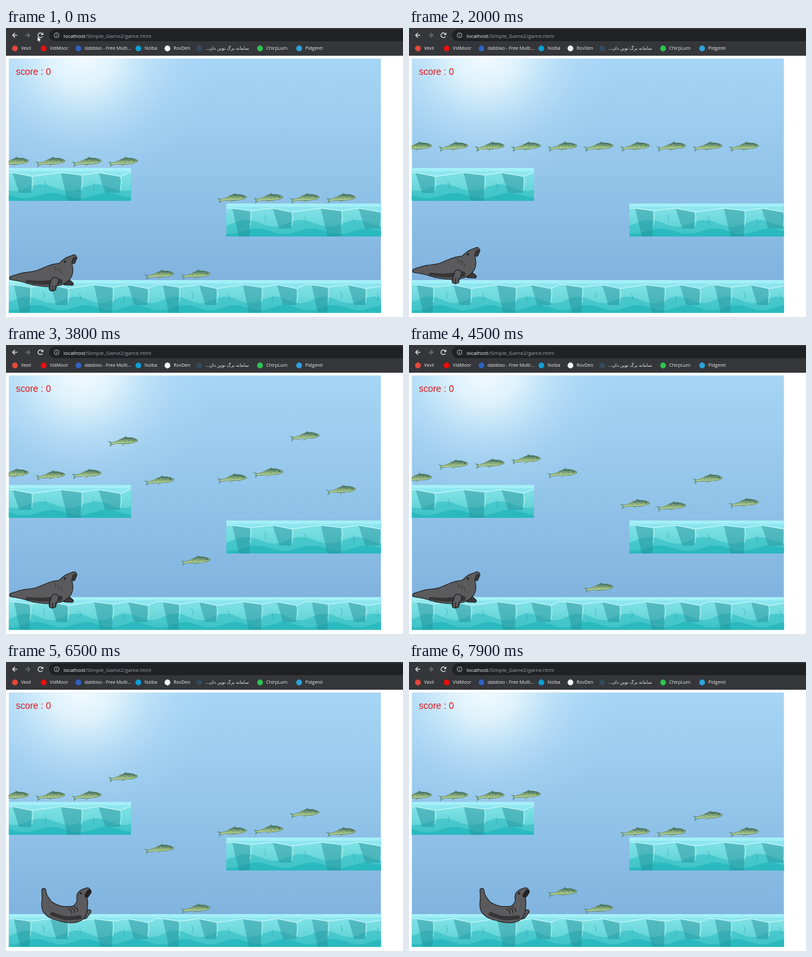
Write an HTML page with a canvas that moves like this. It is 600 by 438 pixels and loops after 8000 ms.

```html
<!DOCTYPE html>
<html lang="en">
<head>
<meta charset="utf-8">
<title>Simple game</title>
<style>
html, body { margin: 0; width: 100%; height: 100%; overflow: hidden; background: #fff; }
#stage { position: absolute; left: 0; top: 0; width: 600px; height: 438px; overflow: hidden; }
canvas { position: absolute; left: 0; top: 0; }
span { position: absolute; white-space: pre; }
.url { left: 87px; top: 5.5px; font: 7.85px/12px "Open Sans", sans-serif; color: #9aa0a6; }
.url b { font-weight: 400; color: #f1f3f4; }
.mark { top: 25px; font: 7px/12px "Open Sans", "DejaVu Sans", sans-serif; color: #e8eaed; }
.score { left: 15px; top: 58.6px; font: 13.8px/16px "Liberation Sans", Arial, sans-serif; color: #e0161f; }
</style>
</head>
<body>
<div id="stage">
  <canvas id="view" width="600" height="438"></canvas>
  <span class="url"><b>localhost</b>/Simple_Game2/game.html</span>
  <span class="score">score : 0</span>
</div>
<script>
const LOOP = 8000, STEP = 100, START = 0.706, G = 160, TOP = 46;
const LEFT = 203, RIGHT = 258, GROUND = 374;
const INK = '#18181a', HIDE = '#5b5b5d', DARK = '#3a3a3c', PALE = '#e8eaed', GREY = '#9aa0a6';
const ctx = document.getElementById('view').getContext('2d');

const bookmarks = [
  [13.5, '#e5483b', 'Vexil'], [57, '#f00c0c', 'VidMoor'], [109.5, '#2f62c4', 'dabbixo - Free Multi...'],
  [200, '#0c9fd6', 'Nolba'], [244, '#f3f4f5', 'RovDen'], [292, '#34495e', 'سامانه برگ نوین دان...'],
  [384, '#2fc351', 'ChirpLum'], [443, '#2ba3dd', 'Pidgerel']
];

// resting height and bounciness of each fish, left to right
const school = [
  [LEFT, .554], [LEFT, .618], [LEFT, .624], [LEFT, .754], [GROUND, .75],
  [GROUND, .4], [RIGHT, .596], [RIGHT, .619], [RIGHT, .763], [RIGHT, .55]
];

// spines: x, y, radius
const FISH = [[6, 3, 1], [14, 1.5, 1.8], [25, -1, 4], [36, -1.5, 3.8], [44, -1.5, 1]];
const RESTING = [[8, 379, 2], [24, 378, 6], [48, 379, 11], [72, 375, 16], [86, 370, 14], [93, 355, 6.5], [103, 348, 3.8]];
const CURLED = [[57, 346, 2.5], [59, 357, 4], [66, 374, 10], [86, 382, 11], [107, 381, 12], [115, 366, 8], [115, 354, 7], [123, 347, 4.5]];

function poly(c, pts, fill) {
  c.beginPath();
  pts.forEach(p => c.lineTo(...p));
  c.fillStyle = fill;
  c.fill();
}

function line(c, pts, color, width = 1) {
  c.beginPath();
  pts.forEach(p => c.lineTo(...p));
  c.strokeStyle = color;
  c.lineWidth = width;
  c.stroke();
}

function disc(c, x, y, r, fill) {
  c.beginPath();
  c.arc(x, y, r, 0, 7);
  c.fillStyle = fill;
  c.fill();
}

function ring(c, x, y, r, color, from = 0, to = 7) {
  c.beginPath();
  c.arc(x, y, r, from, to);
  c.strokeStyle = color;
  c.lineWidth = 1.1;
  c.stroke();
}

function spline(a, b, c, d, u) {
  return b + .5 * u * (c - a + u * (2 * a - 5 * b + 4 * c - d + u * (3 * (b - c) + d - a)));
}

// a rounded body of changing thickness along a smooth spine
function tube(spine, fill, ink, width) {
  const path = new Path2D(), last = spine.length - 1;
  for (let i = 0; i < last; i++) {
    const four = [-1, 0, 1, 2].map(k => spine[Math.max(0, Math.min(last, i + k))]);
    for (let u = 0; u < 1; u += .04) {
      const [x, y, r] = [0, 1, 2].map(k => spline(...four.map(p => p[k]), u));
      path.moveTo(x + r, y);
      path.arc(x, y, r, 0, 2 * Math.PI);
    }
  }
  ctx.strokeStyle = ink;
  ctx.lineWidth = width;
  ctx.stroke(path);
  ctx.fillStyle = fill;
  ctx.fill(path);
}

function gradient(c, g, colors) {
  colors.forEach((color, i) => g.addColorStop(i / (colors.length - 1), color));
  return c.fillStyle = g;
}

function clipGame(c) {
  c.beginPath();
  c.rect(4.4, 46.3, 562.2, 385.2);
  c.clip();
}

function arrow(c, x, dir, color) {
  line(c, [[x - 3.5 * dir, 11], [x + 3.5 * dir, 11]], color, 1.2);
  line(c, [[x, 7.5], [x + 3.5 * dir, 11], [x, 14.5]], color, 1.2);
}

function browserBar(c) {
  c.fillStyle = '#fff';
  c.fillRect(0, 0, 600, 438);
  c.fillStyle = '#35363a';
  c.fillRect(0, 0, 600, 42);
  c.fillStyle = '#202124';
  c.beginPath();
  c.roundRect(65, 2, 560, 18, 9);
  c.fill();
  arrow(c, 13.5, -1, PALE);
  arrow(c, 32.5, 1, '#77797d');
  ring(c, 52, 11, 3.5, PALE, .5, 5.6);
  poly(c, [[56.3, 6.8], [56.3, 10.6], [52.5, 10.6]], PALE);
  ring(c, 76.5, 11, 3.5, GREY);
  line(c, [[76.5, 10.5], [76.5, 13]], GREY);
  line(c, [[76.5, 8.7], [76.5, 9.6]], GREY);
  bookmarks.forEach(([x, color]) => disc(c, x, 31, 4.4, color));
}

function sky(c) {
  gradient(c, c.createLinearGradient(0, 46, 0, 400), ['#a6d5f5', '#93c5ea', '#7eb1dd']);
  c.fillRect(4, 46, 563, 386);
  gradient(c, c.createRadialGradient(115, 38, 0, 115, 38, 205),
    ['rgba(247,253,255,.97)', 'rgba(238,250,254,.78)', 'rgba(218,241,252,.42)', 'rgba(200,231,250,.14)', 'rgba(190,225,248,0)']);
  c.fillRect(4, 46, 563, 386);
}

function wave(c, y, amp, phase, fill) {
  c.beginPath();
  c.moveTo(0, 50);
  for (let x = 0; x <= 249; x += 3) c.lineTo(x, y + amp * Math.sin(x / 249 * Math.PI * 6 + phase));
  c.lineTo(249, 50);
  c.fillStyle = fill;
  c.fill();
}

// one slab of ice, 249 by 50 before scaling
function ice(c, x, y, width) {
  c.save();
  c.translate(x, y);
  c.scale(width / 249, 1);
  c.beginPath();
  c.rect(0, 0, 249, 50);
  c.clip();
  gradient(c, c.createLinearGradient(0, 0, 0, 50), ['#86e4e9', '#6fdadd', '#52cdd0']);
  c.fillRect(0, 0, 249, 50);
  wave(c, 30, 5, 2.4, 'rgba(50,190,195,.6)');
  wave(c, 42, 4, 1.2, '#2ab9be');
  const rim = [[0, 7]];
  [9, 70, 143, 200].forEach((left, i) => {
    const right = left + 27 + i * 2, low = 11 + i % 2 * 2, foot = i % 2 ? 38 : 50;
    poly(c, [[left, 8], [right, low], [right - 1, foot], [left + 10, foot]], 'rgba(35,140,148,.45)');
    line(c, [[right, low], [right + 2, low + 8], [right, 34]], 'rgba(222,252,252,.7)', .9);
    line(c, [[left + 48, 17 + i * 3], [left + 51, 23 + i * 3], [left + 49, 28 + i * 3]], 'rgba(30,150,160,.6)', .8);
    rim.push([left, 7], [right, low]);
  });
  rim.push([249, 6]);
  poly(c, [[0, 0], ...rim, [249, 0]], '#8de6ef');
  c.fillStyle = '#a4eff8';
  c.fillRect(0, 0, 249, 5);
  line(c, rim, 'rgba(222,252,252,.85)');
  c.restore();
}

const scene = document.createElement('canvas');
scene.width = 600;
scene.height = 438;

function paintScene() {
  const c = scene.getContext('2d');
  browserBar(c);
  clipGame(c);
  sky(c);
  [4, 229, 454].forEach(x => ice(c, x, 382, 225));
  ice(c, -60, 212, 249);
  ice(c, 333, 266, 249);
}

function addLabels() {
  bookmarks.forEach(([x, , label]) => {
    const span = document.createElement('span');
    span.className = 'mark';
    span.dir = 'auto';
    span.style.left = x + 9.3 + 'px';
    span.textContent = label;
    document.getElementById('stage').append(span);
  });
}

function fish(x, y) {
  ctx.save();
  ctx.translate(x, y);
  poly(ctx, [[0, -1], [10, 2], [3, 8.5], [4, 3]], '#68988c');
  poly(ctx, [[22, -4], [27, -8], [33, -4]], '#5d8676');
  poly(ctx, [[24, 2], [20, 7], [30, 2]], '#84ac88');
  tube(FISH, gradient(ctx, ctx.createLinearGradient(0, -5, 0, 4), ['#4a7567', '#8cb07a', '#c0d79a']), '#5a806e', .8);
  for (let i = 0; i < 8; i++) {
    ctx.fillStyle = i % 2 ? 'rgba(48,82,68,.5)' : 'rgba(214,228,160,.7)';
    ctx.fillRect(16 + i * 2.2, -3 + i * 7 % 4, 1.2, 1);
  }
  disc(ctx, 40, -2, .8, '#16221f');
  ctx.restore();
}

// parallel skin folds
function folds(x, y, dx, dy, color) {
  for (let i = 0; i < 3; i++) {
    const a = x + i * 4.5, b = y + i * dy;
    line(ctx, [[a, b], [a + dx, b + 3], [a + dx, b + 8]], color);
  }
}

function sealResting(y) {
  ctx.save();
  ctx.translate(0, y);
  tube([[90, 384, 5], [100, 388, 1.5]], DARK, INK, 2);
  tube(RESTING, HIDE, INK, 2);
  tube([[32, 384, 2], [55, 386, 3], [82, 384, 4]], 'rgba(50,50,52,.9)', 'transparent', 0);
  tube([[74, 383, 5], [70, 394, 4.5]], HIDE, INK, 2);
  folds(72, 360, 3, 2.5, DARK);
  folds(66, 390, 0, 0, INK);
  tube([[102, 355, 2], [104, 350, 2]], DARK, INK, 1.5);
  disc(ctx, 89, 354, 1.6, INK);
  ctx.restore();
}

function sealMoving(x) {
  ctx.save();
  ctx.translate(x - 54, 0);
  tube([[118, 384, 5], [126, 378, 2]], HIDE, INK, 2);
  tube(CURLED, HIDE, INK, 2);
  tube([[70, 382, 3], [90, 388, 3], [112, 387, 3]], 'rgba(50,50,52,.9)', 'transparent', 0);
  folds(93, 374, 6, -1.5, INK);
  tube([[122, 354, 2.5], [126, 348, 2.5]], '#242425', INK, 1.5);
  disc(ctx, 113, 350.5, 1.5, INK);
  ctx.restore();
}

// height above the resting place after a drop, t in seconds
function height(t, drop, bounce) {
  if (t < 0) return 0;
  const fall = Math.sqrt(2 * drop / G);
  if (t < fall) return drop - G * t * t / 2;
  t -= fall;
  for (let v = G * fall * bounce; v > 3; v *= bounce) {
    const span = 2 * v / G;
    if (t < span) return v * t - G * t * t / 2;
    t -= span;
  }
  return 0;
}

function cursor(x, y) {
  const pts = [[0, 0], [0, 8.5], [2, 6.8], [3.5, 9.5], [4.8, 9], [3.5, 6.2], [6, 6], [0, 0]].map(([a, b]) => [x + a, y + b]);
  poly(ctx, pts, '#fff');
  line(ctx, pts, '#111', .6);
}

function draw(ms) {
  const t = ms / 1000;
  ctx.drawImage(scene, 0, 0);
  ctx.save();
  clipGame(ctx);
  if (t < 6.2) sealResting(-height(t - START, 145, .2));
  else sealMoving(54 + (t - 6.5) * (t < 6.5 ? 185 : 38));
  school.forEach(([rest, bounce], i) =>
    fish(-11 + 54.9 * i, rest - height(t - START, rest - TOP, bounce)));
  ctx.restore();
  if (t < 1.1) cursor(47.5, 12.5);
}

function tick(now) {
  draw(Math.floor(now % LOOP / STEP) * STEP);
  requestAnimationFrame(tick);
}

addLabels();
paintScene();
draw(0);
requestAnimationFrame(tick);
</script>
</body>
</html>
```
